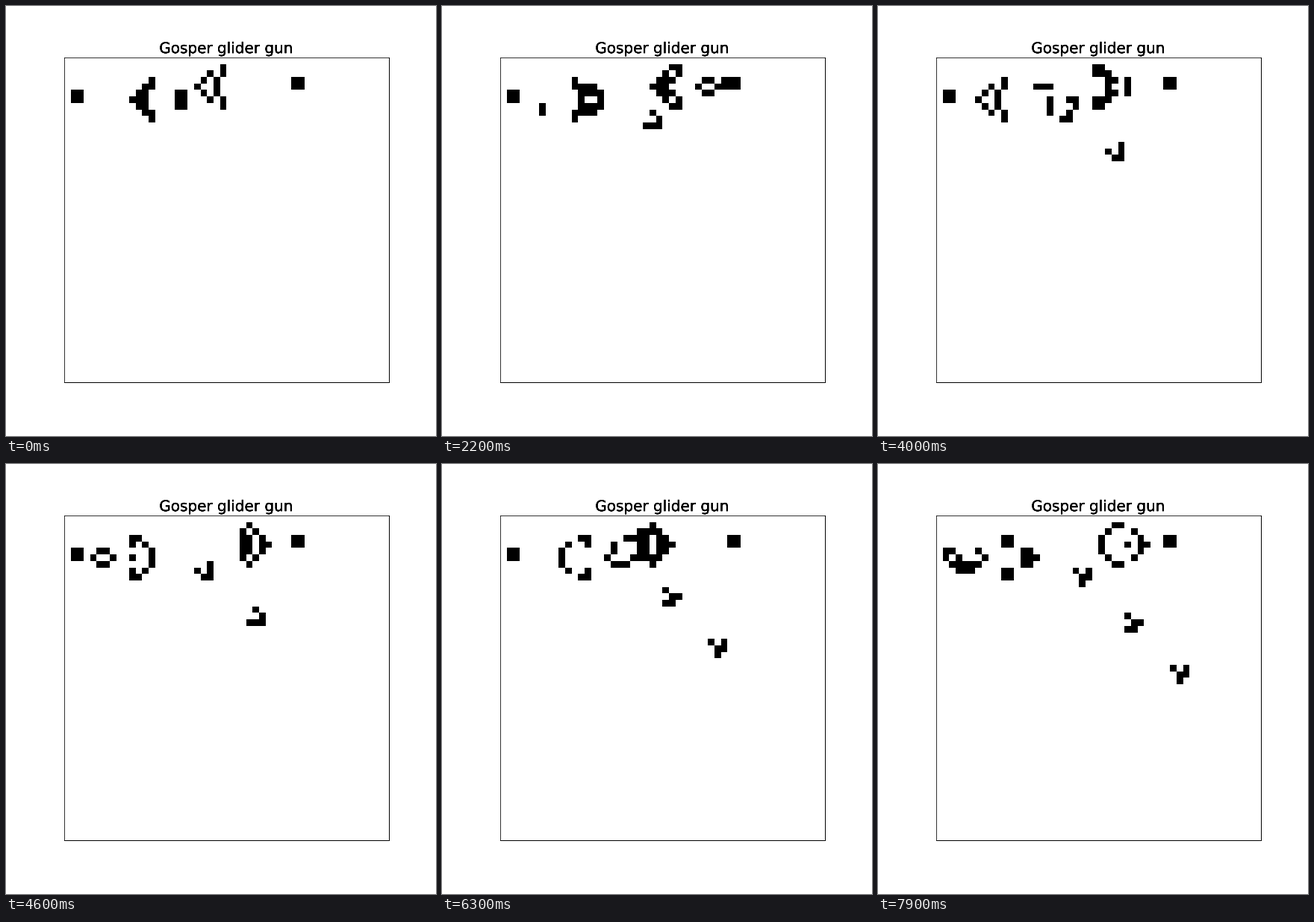
These frames come from a looping animation (576 px wide and 576 px high, 8000 ms). A matplotlib script:

```python
import matplotlib.pyplot as plt
import numpy as np
from matplotlib.animation import FuncAnimation
from matplotlib.patheffects import Normal

SIZE = 50
FRAMES = 80
GUN = """
........................O
......................O.O
............OO......OO............OO
...........O...O....OO............OO
OO........O.....O...OO
OO........O...O.OO....O.O
..........O.....O.......O
...........O...O
............OO
""".split()


def first_grid():
    grid = np.zeros((SIZE, SIZE), dtype=int)
    for r, row in enumerate(GUN, 1):
        for c, ch in enumerate(row, 1):
            grid[r, c] = ch == "O"
    return grid


def step(grid):
    p = np.pad(grid, 1)
    around = sum(p[r:r + SIZE, c:c + SIZE]
                 for r in range(3) for c in range(3)) - grid
    return ((around == 3) | ((grid == 1) & (around == 2))).astype(int)


# The pattern is shown from its first generation after the seed
history = [step(first_grid())]
while len(history) < FRAMES:
    history.append(step(history[-1]))

fig, ax = plt.subplots(figsize=(8, 8), dpi=72)
fig.subplots_adjust(left=0.125, right=0.9, bottom=0.125, top=0.88)
image = ax.imshow(history[0], cmap="binary", interpolation="nearest",
                  vmin=0, vmax=1)
ax.set(xticks=[], yticks=[])
for side, width in dict(left=0.8, top=0.8, right=1, bottom=1).items():
    ax.spines[side].set_linewidth(width)

# Repeated passes give the title its hard, heavy edges
ax.set_title("Gosper glider gun", fontsize=20, family="DejaVu Sans",
             path_effects=[Normal()] * 4)


def draw(i):
    image.set_data(history[i])
    return [image]


anim = FuncAnimation(fig, draw, frames=FRAMES, interval=100, repeat=True,
                     repeat_delay=0)
plt.show()
```
